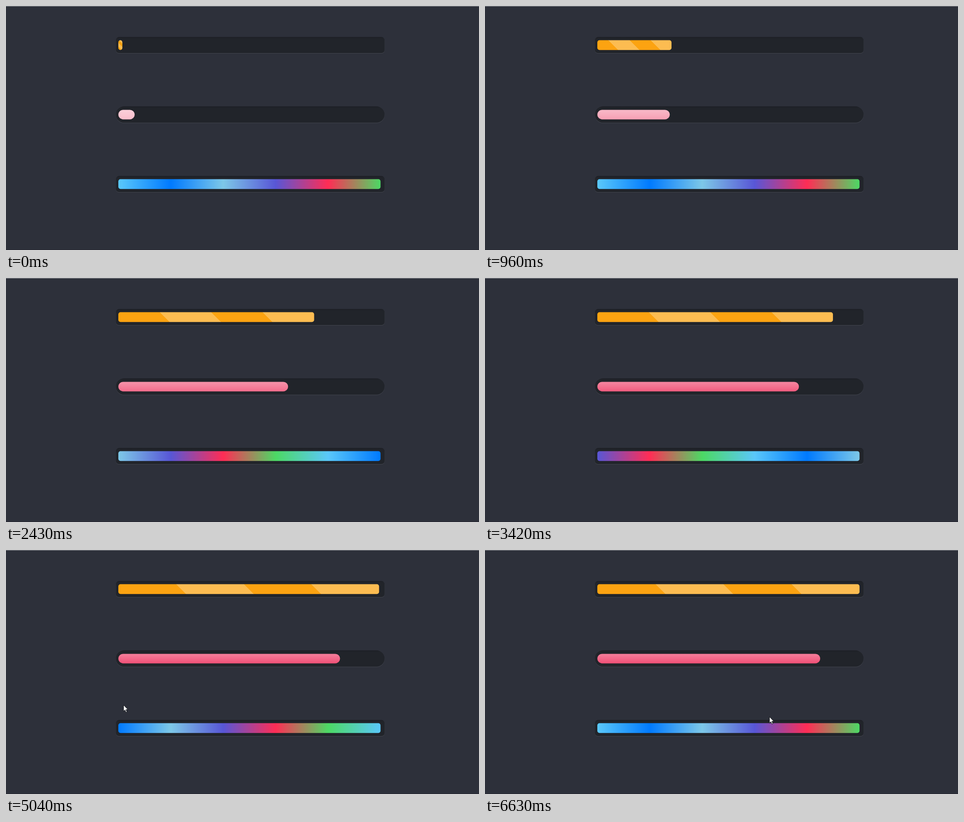
Write an HTML page that moves like this. It is 1040 px wide and 539 px high and loops after 6.65 s.

```html
<!DOCTYPE html>
<html lang="en">
<head>
<meta charset="utf-8">
<title>Progress bars</title>
<style>
  html, body { margin: 0; width: 100%; height: 100%; overflow: hidden; background: #2d303a; }
  svg { display: block; width: 100%; height: 100%; }
</style>
</head>
<body>
<svg id="stage" viewBox="0 0 1040 539" preserveAspectRatio="none">
  <defs>
    <linearGradient id="groove" x1="0" y1="0" x2="0" y2="1">
      <stop offset="0" stop-color="#1b1d23"/>
      <stop offset=".09" stop-color="#21242a"/>
    </linearGradient>
    <linearGradient id="gloss" x1="0" y1="0" x2="0" y2="1">
      <stop offset="0" stop-color="#fff" stop-opacity=".3"/>
      <stop offset="1" stop-color="#fff" stop-opacity=".05"/>
    </linearGradient>
    <linearGradient id="stripes" gradientUnits="userSpaceOnUse"></linearGradient>
    <linearGradient id="rainbow"></linearGradient>
  </defs>
  <rect width="1040" height="539" fill="#2d303a"/>
  <rect width="1040" height="1" fill="#8d9094"/>
  <rect y="538" width="1040" height="1" fill="#262731"/>
  <g id="tracks"></g>
  <rect id="striped" x="247" y="75.6" height="21.6" rx="4.8" fill="url(#stripes)"/>
  <rect id="pink" x="247" y="229.4" height="21" rx="10.5"/>
  <rect id="shine" x="247" y="229.4" height="21" rx="10.5" fill="url(#gloss)"/>
  <rect x="247" y="382.6" width="576.5" height="21.6" rx="4.8" fill="url(#rainbow)"/>
  <path id="cursor" d="M.5 .5V14.2L3.6 11.3L5.8 16.6L8 15.6L5.8 10.5H10Z" fill="#fff" stroke="#16181d" stroke-width="1"/>
</svg>
<script>
const LOOP = 6650, STEP = 120, FULL = 576.5, LEFT = 247;
// Runs of evenly timed pictures; the last one of a run stays 30 ms longer.
const RUNS = [0, 1950, 2940, 4770, 5040, 6150, 6800];
const COLORS = ['#4cd964', '#5ac8fa', '#007aff', '#7dc8e8', '#5856d6', '#ff2d55'];
const SHIFTS = [0.058, 0.259, 0.459, 0.722];
const PINK_FROM = [249, 188, 202], PINK_TO = [239, 71, 111];
// Pointer path: time, x, y
const PATH = [
  [4770, 0, 326], [4890, 147, 334], [5040, 258, 342], [5280, 372, 350],
  [5760, 455, 346], [6000, 496, 312], [6270, 560, 328], [6630, 625, 368]
];

const $ = id => document.getElementById(id);
const mix = (a, b, k) => a + (b - a) * k;
const set = (el, attrs) => {
  for (const name in attrs) el.setAttribute(name, attrs[name]);
};
function add(parent, tag, attrs) {
  const el = document.createElementNS('http://www.w3.org/2000/svg', tag);
  set(el, attrs);
  return parent.appendChild(el);
}

function track(y, h, r) {
  const box = { x: 241.5, width: 591, height: h, rx: r };
  add($('tracks'), 'rect', { ...box, y: y + 1, fill: '#41444d' });
  add($('tracks'), 'rect', { ...box, y, fill: 'url(#groove)' });
}
track(68.6, 35.4, 7);
track(221.8, 36, 18);
track(375.6, 35.4, 7);

['#fca311', '#fcbc51', '#fca311', '#fcbc51'].forEach((color, i) => {
  for (const end of [i, i + 1]) add($('stripes'), 'stop', { offset: end / 4, 'stop-color': color });
});
const rainbowStops = COLORS.map((c, i) => add($('rainbow'), 'stop', { offset: i / 5 }));

// cubic-bezier(.25, .1, .25, 1)
function ease(x) {
  if (x >= 1) return 1;
  const curve = (a, b, s) => 3 * a * s * (1 - s) ** 2 + 3 * b * s * s * (1 - s) + s ** 3;
  let lo = 0, hi = 1;
  for (let i = 0; i < 30; i++) {
    const mid = (lo + hi) / 2;
    if (curve(.25, .25, mid) < x) lo = mid; else hi = mid;
  }
  return curve(.1, 1, lo);
}

function hold(t) {
  const i = RUNS.findIndex((start, n) => t < RUNS[n + 1]);
  const stepped = RUNS[i] + Math.floor((t - RUNS[i]) / STEP) * STEP;
  return Math.min(stepped, RUNS[i + 1] - 150);
}

function drawStripes(k) {
  const w = FULL * k, h = 21.6, bottom = 75.6 + h, half = (w + h) / 2;
  set($('striped'), { width: w });
  set($('stripes'), { x1: LEFT, y1: bottom, x2: LEFT + half, y2: bottom - half });
}

function drawPink(k) {
  const width = FULL * mix(.05, .85, k);
  const rgb = PINK_FROM.map((c, i) => Math.round(mix(c, PINK_TO[i], k)));
  set($('pink'), { width, fill: `rgb(${rgb})` });
  set($('shine'), { width });
}

function drawRainbow(phase) {
  const shift = SHIFTS.filter(s => phase >= s).length;
  rainbowStops.forEach((stop, i) => set(stop, { 'stop-color': COLORS[(i + shift) % 6] }));
}

function drawCursor(t) {
  const shown = t >= PATH[0][0];
  set($('cursor'), { visibility: shown ? 'visible' : 'hidden' });
  if (!shown) return;
  const i = Math.max(1, PATH.findIndex(p => p[0] >= t));
  const [t0, x0, y0] = PATH[i - 1], [t1, x1, y1] = PATH[i];
  const k = (t - t0) / (t1 - t0);
  set($('cursor'), { transform: `translate(${mix(x0, x1, k)} ${mix(y0, y1, k)})` });
}

function render(now) {
  const t = hold(now % LOOP);
  const clock = 170 + t * 1.039;
  const k = ease(clock / 6000);
  drawStripes(k);
  drawPink(k);
  drawRainbow(clock % 1000 / 1000);
  drawCursor(t);
}

let begin;
function tick(now) {
  begin ??= now;
  render(now - begin);
  requestAnimationFrame(tick);
}
render(0);
requestAnimationFrame(tick);
</script>
</body>
</html>
```
